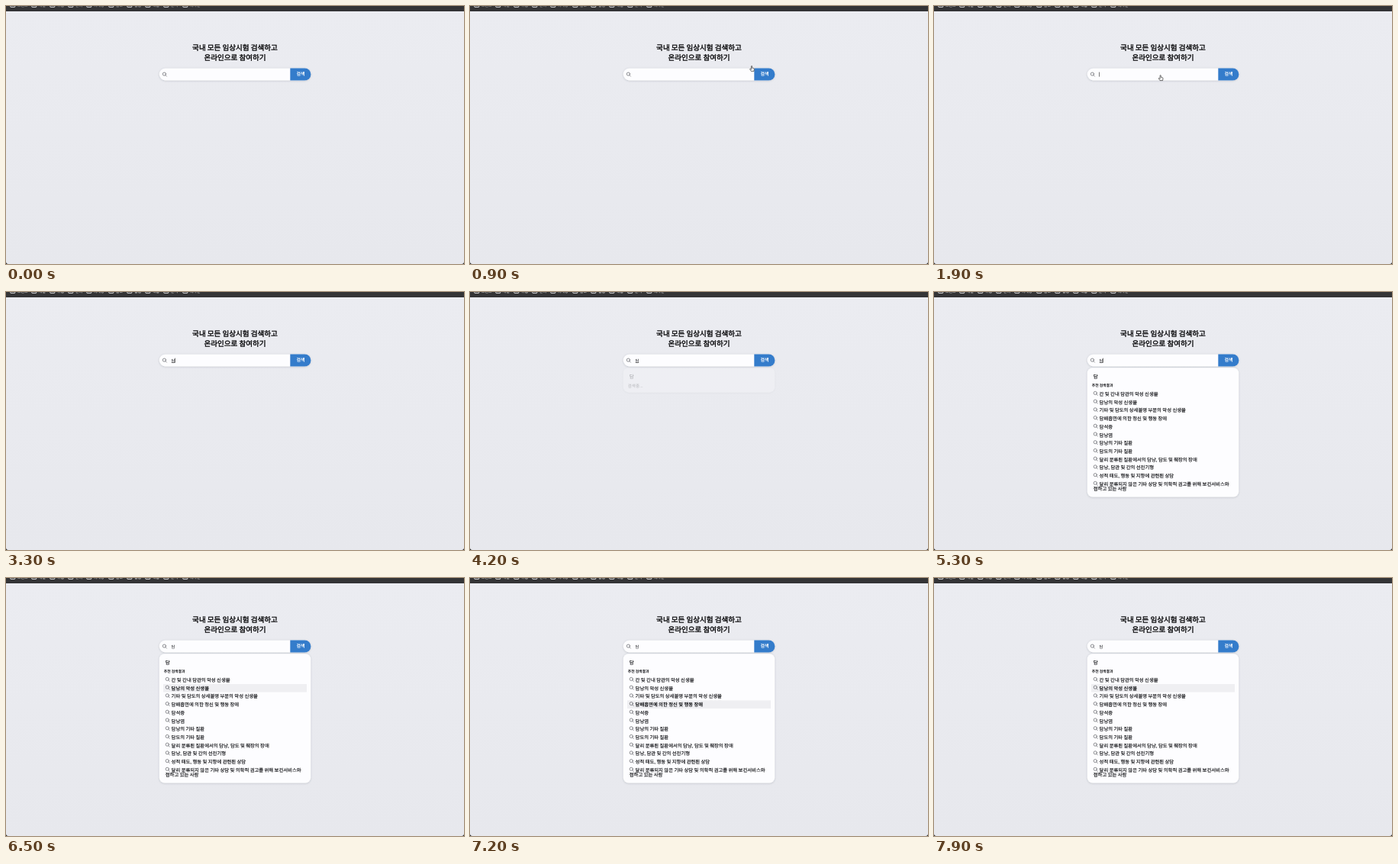
An HTML page that plays this animation: 600x338 px, repeating every 8 s.

```html
<!DOCTYPE html>
<html lang="ko">
<head>
<meta charset="utf-8">
<style>
  html, body { margin: 0; width: 100%; height: 100%; overflow: hidden; background: #111; }
  svg { display: block; width: 600px; height: 338px; }
  text {
    font-family: "Liberation Sans", "Noto Sans CJK KR", "Noto Sans CJK JP", sans-serif;
    fill: #101114; white-space: pre; word-spacing: -.054em; text-rendering: geometricPrecision;
  }
  .title { font-size: 9.56px; text-anchor: middle; fill: #08080a; stroke: #08080a; stroke-width: .36; }
  .row { font-size: 6.33px; stroke: #101114; stroke-width: .14; }
  .row.on { font-weight: 700; stroke: none; }
  .lens { fill: none; stroke: #55575d; stroke-width: .65; stroke-linecap: round; }
  .card { fill: #fdfdff; }
</style>
</head>
<body>
<svg viewBox="0 0 600 338">
  <defs>
    <linearGradient id="page" x1="0" y1="0" x2="0" y2="1">
      <stop offset="0" stop-color="#ebecf1"/>
      <stop offset="1" stop-color="#e7e8ed"/>
    </linearGradient>
    <filter id="soft" x="-5%" y="-30%" width="110%" height="170%">
      <feDropShadow dx="0" dy=".5" stdDeviation=".8" flood-color="#30384a" flood-opacity=".25"/>
    </filter>
    <g id="lens" class="lens"><circle r="2.1"/><path d="M1.5 1.5L3 3"/></g>
  </defs>

  <path d="M0 0H600V335a3 3 0 0 1-3 3H3a3 3 0 0 1-3-3Z" fill="url(#page)"/>
  <rect width="600" height="7" fill="#343436"/>
  <g id="folders" fill="none" stroke="#f0f0f2" stroke-width=".9"></g>
  <g id="labels"></g>

  <text class="title" x="300" y="57.5">국내 모든 임상시험 검색하고</text>
  <text class="title" x="300" y="71">온라인으로 참여하기</text>

  <rect class="card" x="200.8" y="81.8" width="198.4" height="15.6" rx="7.8" filter="url(#soft)"/>
  <path d="M372.3 81.5H391.4a8 8 0 0 1 0 16H372.3Z" fill="#347ccb"/>
  <text x="380.4" y="91.4" style="font-size:6px;font-weight:700;fill:#fff">검색</text>
  <use href="#lens" x="207.4" y="89.1"/>
  <text id="query" x="216.4" y="91.5" style="font-size:5.3px"></text>
  <path id="under" d="M216.8 92.4H221.2" stroke="#222" stroke-width=".6"/>
  <rect id="caret" y="86.6" width=".6" height="6" fill="#222"/>

  <g id="panel">
    <rect id="sheet" class="card" x="200.8" y="99.2" width="198.4" rx="7" filter="url(#soft)"/>
    <text class="row" x="208.8" y="113.4">담</text>
    <text id="wait" x="206.8" y="125" style="font-size:5.5px">검색중...</text>
    <g id="list">
      <text x="206.8" y="124.3" style="font-size:4.8px;font-weight:700">추천 검색결과</text>
      <rect id="mark" x="206" width="188" height="10.6" fill="#efeff2"/>
      <g id="rows"></g>
      <text class="row" x="208.8" y="260.3">접하고 있는 사람</text>
    </g>
  </g>

  <g id="hand">
    <path d="M-.9-3.2c0-.9 1.2-.9 1.2 0v2l2 .5c.6.2.8.5.7 1.1L2.6 3.1H-1L-2.6.7c-.4-.7.5-1.1 1-.5l.7.7Z"
      fill="#fff" stroke="#222" stroke-width=".65" stroke-linejoin="round"/>
  </g>
  <g id="arrow">
    <path d="M-2-3.6V3L-.5 1.7.5 4 1.6 3.5.6 1.3H2.7Z" fill="#111" stroke="#fff" stroke-width=".5"/>
  </g>
</svg>
<script>
const LOOP = 8000, STEP = 100;
const $ = id => document.getElementById(id);
const NS = "http://www.w3.org/2000/svg";

function add(parent, tag, attrs, text = "") {
  const el = document.createElementNS(NS, tag);
  for (const k in attrs) el.setAttribute(k, attrs[k]);
  el.textContent = text;
  return parent.appendChild(el);
}
const show = (id, on) => $(id).setAttribute("visibility", on ? "inherit" : "hidden");

const bookmarks = [
  [6, "트렌드"], [34, "개발"], [58, "취업"], [82, "관리"], [106, "마케팅"],
  [135, "블로"], [159, "협업"], [183, "학습"], [207, "문서"], [232, "디자인"]
];
for (const [x, name] of bookmarks) {
  add($("folders"), "rect", { x: x - .2, y: -3, width: 6, height: 4.4, rx: .5 });
  add($("labels"), "text", { x: x + 9, y: 1.3, style: "font-size:4.9px;fill:#fff" }, name);
}

const terms = [
  "간 및 간내 담관의 악성 신생물",
  "담낭의 악성 신생물",
  "기타 및 담도의 상세불명 부분의 악성 신생물",
  "담배흡연에 의한 정신 및 행동 장애",
  "담석증",
  "담낭염",
  "담낭의 기타 질환",
  "담도의 기타 질환",
  "달리 분류된 질환에서의 담낭, 담도 및 췌장의 장애",
  "담낭, 담관 및 간의 선천기형",
  "성적 태도, 행동 및 지향에 관련된 상담",
  "달리 분류되지 않은 기타 상담 및 의학적 권고를 위해 보건서비스와"
];
const rowY = i => 135.9 + i * 10.72;
const rows = terms.map((term, i) => {
  add($("rows"), "use", { href: "#lens", x: 211.3, y: rowY(i) - 3.5 });
  return add($("rows"), "text", { class: "row", x: 216.6, y: rowY(i) }, term);
});

// [time, value], each held until the next
const typed = [[0, ""], [2900, "ㄷ"], [3100, "다"], [3300, "담"]];
const picks = [[0, -1], [6100, 0], [6500, 1], [6900, 2], [7200, 3], [7600, 2], [7900, 1]];
const blinks = [[0, 0], [1700, 1], [2200, 0], [2900, 1], [3800, 0], [4300, 1],
  [4800, 0], [5300, 1], [6300, 0], [6800, 1], [6900, 0]];
// [time, x, y]
const path = [[200, 456, 35], [400, 417, 45], [600, 366, 76], [700, 348, 92], [850, 362, 86],
  [1000, 384, 75], [1100, 297, 96], [1700, 297, 96], [1900, 297, 94.5], [2000, 297, 94.5],
  [2200, 410, 92], [2400, 523, 90]];

const at = (steps, t) => steps.filter(s => s[0] <= t).pop()[1];

function along(t) {
  const i = path.findIndex(p => p[0] > t);
  if (i < 0) return path[path.length - 1].slice(1);
  const a = path[Math.max(i - 1, 0)], b = path[i];
  const k = Math.max(0, (t - a[0]) / (b[0] - a[0] || 1));
  return [a[1] + (b[1] - a[1]) * k, a[2] + (b[2] - a[2]) * k];
}

function draw(t) {
  const query = at(typed, t), pick = at(picks, t), found = t >= 5300;

  $("labels").setAttribute("transform", `translate(0 ${t < 1400 ? 0 : -.3})`);
  $("labels").setAttribute("opacity", t < 1400 ? .75 : 1);

  $("query").textContent = query;
  show("under", query && t < 5800);
  show("caret", at(blinks, t));
  $("caret").setAttribute("x", query ? 221.1 : 216.4);

  $("panel").setAttribute("opacity", Math.min(1, Math.max(0, (t - 4100) / 400)));
  $("sheet").setAttribute("height", found ? 169.4 : 32.2);
  show("wait", !found);
  show("list", found);
  show("mark", found && pick >= 0);
  $("mark").setAttribute("y", rowY(pick) - 7.7);
  rows.forEach((row, i) => row.classList.toggle("on", i === pick));

  const [x, y] = along(t);
  const live = t >= 200 && t < 2900;
  const over = x > 201 && x < 399 && y > 82 && y < 98;
  show("hand", live && over);
  show("arrow", live && !over);
  for (const id of ["hand", "arrow"]) $(id).setAttribute("transform", `translate(${x} ${y})`);
}

const start = performance.now();
function tick() {
  const t = (performance.now() - start) % LOOP;
  draw(Math.floor(t / STEP) * STEP);
  requestAnimationFrame(tick);
}
tick();
</script>
</body>
</html>
```
